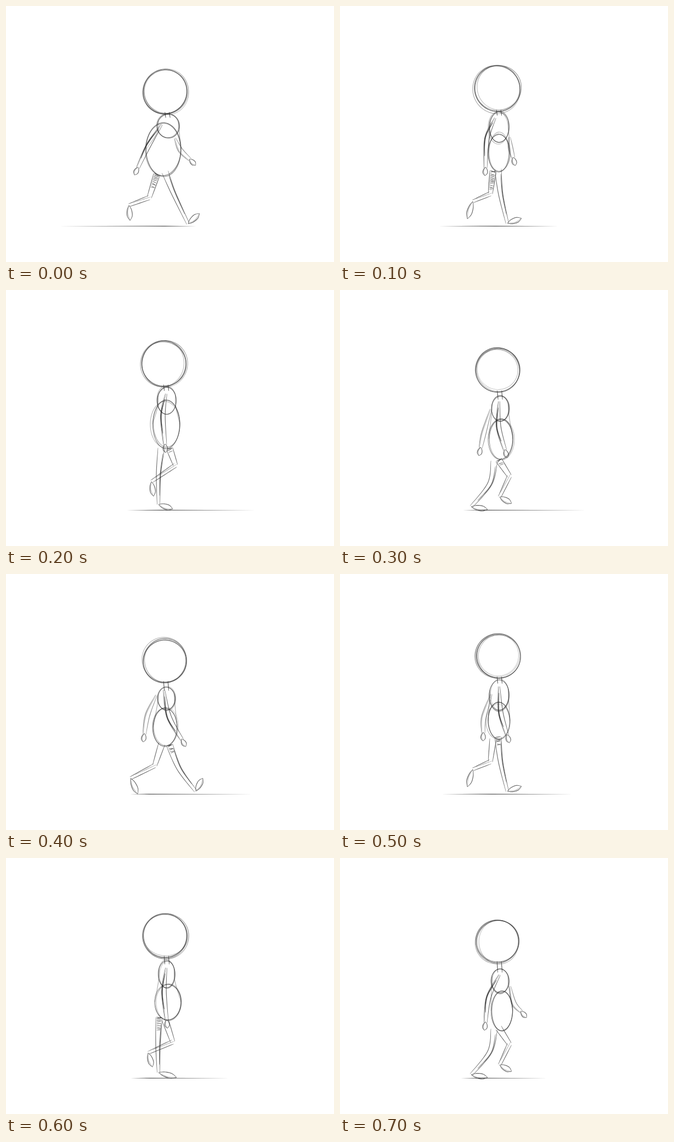
Recreate the animation shown at these times as an HTML page. Size 600x469 px, loop 800 ms.

```html
<!DOCTYPE html>
<html lang="en">
<head>
<meta charset="utf-8">
<title>Walk cycle sketch</title>
<style>
html, body { margin: 0; width: 100%; height: 100%; overflow: hidden; background: #fff; }
svg { display: block; width: 100%; height: 100%; }
</style>
</head>
<body>
<svg id="stage" viewBox="0 0 600 469"></svg>
<script>
const NS = 'http://www.w3.org/2000/svg';
const STEP = 100;
const FLOOR = 403.3;
const stage = document.getElementById('stage');

let group;
let seed = 7;
function random() {
  seed = (seed * 16807) % 2147483647;
  return seed / 2147483647;
}
const wobble = size => (random() - 0.5) * 2 * size;
const mix = (a, b, t) => [a[0] + (b[0] - a[0]) * t, a[1] + (b[1] - a[1]) * t];

// Unit direction and its normal
function axis(a, b) {
  const dx = b[0] - a[0], dy = b[1] - a[1], len = Math.hypot(dx, dy) || 1;
  return { u: [dx / len, dy / len], n: [-dy / len, dx / len], len };
}
const shift = (p, v, d) => [p[0] + v[0] * d, p[1] + v[1] * d];

function fill(d, alpha) {
  const path = document.createElementNS(NS, 'path');
  path.setAttribute('d', d);
  path.setAttribute('fill', '#2b2b2b');
  path.setAttribute('fill-opacity', alpha);
  group.append(path);
}

// Smooth curve through a few points
function spline(p) {
  const out = [];
  for (let i = 0; i < p.length - 1; i++) {
    const a = p[i - 1] || p[i], b = p[i], c = p[i + 1], d = p[i + 2] || c;
    for (let k = 0; k < 10; k++) {
      const t = k / 10;
      out.push([0, 1].map(n => b[n] + 0.5 * t * (c[n] - a[n] +
        t * (2 * a[n] - 5 * b[n] + 4 * c[n] - d[n] + t * (3 * (b[n] - c[n]) + d[n] - a[n])))));
    }
  }
  return [...out, p[p.length - 1]];
}

// Pencil line that thins out at both ends
function ribbon(pts, width, alpha) {
  const left = [], right = [], last = pts.length - 1;
  pts.forEach((p, i) => {
    const { n } = axis(pts[Math.max(i - 1, 0)], pts[Math.min(i + 1, last)]);
    const w = width / 2 * (0.45 + 0.55 * Math.sin(Math.PI * i / last));
    const text = d => shift(p, n, d).map(v => v.toFixed(2)).join(' ');
    left.push(text(w));
    right.unshift(text(-w));
  });
  fill('M' + left.concat(right).join('L') + 'Z', alpha);
}
const line = (pts, alpha = 0.7, width = 1.15) => ribbon(spline(pts), width, alpha);

function ring(cx, cy, rx, ry, alpha) {
  const start = random() * 6.28, phase = random() * 6.28, pts = [];
  for (let i = 0; i <= 64; i++) {
    const a = start + i / 64 * 6.6;
    const r = 1 + 0.014 * Math.sin(2 * a + phase);
    pts.push([cx + rx * r * Math.cos(a), cy + ry * r * Math.sin(a)]);
  }
  ribbon(pts, 1.2, alpha);
}

function loops([cx, cy, rx, ry = rx], count, spread) {
  for (let i = 0; i < count; i++) {
    const s = spread * i / count;
    ring(cx + wobble(s), cy + wobble(s), rx + wobble(s), ry + wobble(s), 0.62 - 0.4 * i / count);
  }
}

function leaf(a, b, half) {
  const { n } = axis(a, b);
  for (const side of [half, -half]) {
    line([a, shift(mix(a, b, 0.3), n, side * 0.85), shift(mix(a, b, 0.7), n, side), b], 0.75);
  }
  line([a, shift(mix(a, b, 0.5), n, half * 0.7), b], 0.35);
}

// Points beside a joint chain
function edge(joints, widths, side) {
  return joints.map((p, i) => {
    const { n } = axis(joints[Math.max(i - 1, 0)], joints[Math.min(i + 1, joints.length - 1)]);
    return shift(p, n, widths[i] * side);
  });
}

const pairs = flat => flat.flatMap((v, i) => i % 2 ? [] : [[v, flat[i + 1]]]);

function arm(flat, near) {
  const joints = pairs(flat), [top, elbow, hand] = joints;
  const alpha = near ? 0.72 : 0.55;
  for (const side of [1, -1]) line(edge(joints, [1.5, 4.2, 3], side), alpha);
  line(edge(joints, [0, 2.6, 2], 1), 0.35);
  if (near) line(edge([mix(top, elbow, 0.25), elbow, mix(elbow, hand, 0.6)], [1, 3.4, 2.5], 1), 0.85, 1.5);
  const { u } = axis(elbow, hand);
  leaf(shift(hand, u, -2), shift(hand, u, 14), 4);
}

function leg(flat, hatch) {
  const [hip, knee, heel, toe] = pairs(flat);
  const thigh = axis(hip, knee), shin = axis(knee, heel);
  const straight = thigh.u[0] * shin.u[0] + thigh.u[1] * shin.u[1] > 0.88;
  for (const side of [1, -1]) {
    if (straight) {
      line(edge([hip, knee, heel], [6, 4, 2.6], side));
    } else {
      line([shift(hip, thigh.n, 6 * side), shift(knee, thigh.n, 4 * side)]);
      line([shift(knee, shin.n, 4 * side), shift(heel, shin.n, 2.6 * side)]);
    }
  }
  if (straight) line(edge([mix(hip, knee, 0.2), knee, mix(knee, heel, 0.7)], [4, 3, 2], -1), 0.65, 1.3);
  else line([shift(knee, shin.u, -4), shift(mix(knee, heel, 0.8), shin.n, 2)], 0.35);
  leaf(heel, toe, 4.6);

  const count = Math.round(hatch * thigh.len / 3);
  for (let i = 0; i < count; i++) {
    const c = mix(hip, knee, hatch * i / count), w = 5 - 1.5 * i / count;
    line([shift(c, thigh.n, w), shift(shift(c, thigh.n, -w), thigh.u, wobble(3))], 0.85 - 0.4 * i / count);
  }
}

function torso(head, chest, belly) {
  const [cx, cy, rx, ry] = chest, [bx, by, bw, bh] = belly;
  loops(chest, 3, 2.5);
  loops(belly, 3, 3);
  for (const side of [-1, 1]) {
    line([[cx + side * rx * 0.9, cy - ry * 0.4], [cx + side * rx, cy + ry * 0.5], [bx + side * bw, by]], 0.4);
    const x = (head[0] + cx) / 2 + 0.7 + side * 4;
    line([[x, head[1] + head[2] - 3], [x + 1.5, cy - ry + 7]], 0.8);
  }
}

function ground([from, peak, to]) {
  fill(`M${from} ${FLOOR}L${peak} ${FLOOR - 0.65}L${to} ${FLOOR}L${peak} ${FLOOR + 0.65}Z`, 0.8);
}

function draw(pose) {
  group = document.createElementNS(NS, 'g');
  ground(pose.floor);
  loops(pose.head, 5, 4);
  torso(pose.head, pose.chest, pose.belly);
  if (pose.farArm) arm(pose.farArm, false);
  leg(pose.farLeg, pose.hatch);
  leg(pose.nearLeg, 0);
  arm(pose.nearArm, true);
  stage.append(group);
  return group;
}

const contactA = {
  floor: [97, 290, 348], head: [291, 157, 40],
  chest: [297, 220, 20, 22], belly: [288, 263, 32, 49],
  nearArm: [285, 217, 261, 255, 241, 297], farArm: [309, 242, 319, 264, 337, 282],
  nearLeg: [291, 304, 306, 342, 333, 399, 354, 380],
  farLeg: [276, 308, 262, 351, 225, 365, 227, 393], hatch: 0.65
};

const recoilA = {
  floor: [181, 285, 399], head: [288, 151, 42],
  chest: [291, 222, 18, 28], belly: [291, 269, 20, 34],
  nearArm: [284, 205, 269, 242, 266, 297], farArm: [310, 240, 312, 260, 317, 279],
  nearLeg: [289, 299, 294, 345, 306, 398, 332, 389],
  farLeg: [280, 302, 275, 344, 243, 358, 233, 390], hatch: 0.9
};

const passingA = {
  floor: [221, 284, 456], head: [289, 135, 41],
  chest: [294, 203, 17, 25], belly: [293, 246, 25, 44],
  nearArm: [293, 190, 287, 230, 291, 284],
  nearLeg: [284, 290, 279, 338, 279, 393, 305, 401],
  farLeg: [299, 290, 310, 321, 266, 351, 270, 378], hatch: 0.3
};

const contactB = {
  floor: [227, 262, 451], head: [290, 160, 39],
  chest: [293, 228, 16, 21], belly: [291, 281, 22, 35],
  nearArm: [289, 212, 298, 261, 322, 304], farArm: [275, 222, 259, 258, 253, 294],
  nearLeg: [285, 311, 272, 351, 228, 374, 241, 403],
  farLeg: [299, 313, 317, 357, 347, 398, 360, 374], hatch: 0.38
};

const passingB = {
  floor: [228, 264, 408], head: [291, 142, 40],
  chest: [294, 213, 15, 25], belly: [296, 264, 24, 33],
  nearArm: [293, 201, 289, 245, 294, 298],
  nearLeg: [291, 296, 305, 337, 260, 357, 268, 383],
  farLeg: [280, 292, 278, 345, 279, 393, 312, 402], hatch: 0.5
};

const reachB = {
  floor: [221, 255, 379], head: [288, 153, 39],
  chest: [293, 225, 16, 22], belly: [296, 280, 20, 36],
  nearArm: [292, 214, 272, 255, 266, 302], farArm: [311, 235, 318, 266, 332, 282],
  nearLeg: [290, 311, 310, 341, 292, 379, 314, 391],
  farLeg: [282, 314, 274, 355, 240, 397, 270, 402], hatch: 0
};

// The opposite steps reuse the same legs, swapped
const reachA = {
  ...reachB, floor: [225, 265, 450], head: [289, 147, 40],
  chest: [293, 217, 16, 23], belly: [294, 273, 22, 37],
  nearArm: [291, 204, 290, 250, 302, 294], farArm: [276, 218, 263, 262, 257, 290],
  nearLeg: reachB.farLeg, farLeg: reachB.nearLeg, hatch: 0.35
};

const recoilB = {
  ...recoilA, floor: [186, 278, 425], head: [290, 151, 40],
  nearArm: [291, 206, 294, 254, 306, 296], farArm: [277, 220, 263, 262, 262, 292],
  nearLeg: recoilA.farLeg, farLeg: recoilA.nearLeg, hatch: 0.38
};

const poses = [contactA, recoilA, passingA, reachA, contactB, recoilB, passingB, reachB].map(draw);

function update(time) {
  const now = Math.floor(time / STEP) % poses.length;
  poses.forEach((pose, i) => pose.style.display = i === now ? '' : 'none');
}

function tick() {
  update(performance.now());
  requestAnimationFrame(tick);
}
update(0);
requestAnimationFrame(tick);
</script>
</body>
</html>
```
